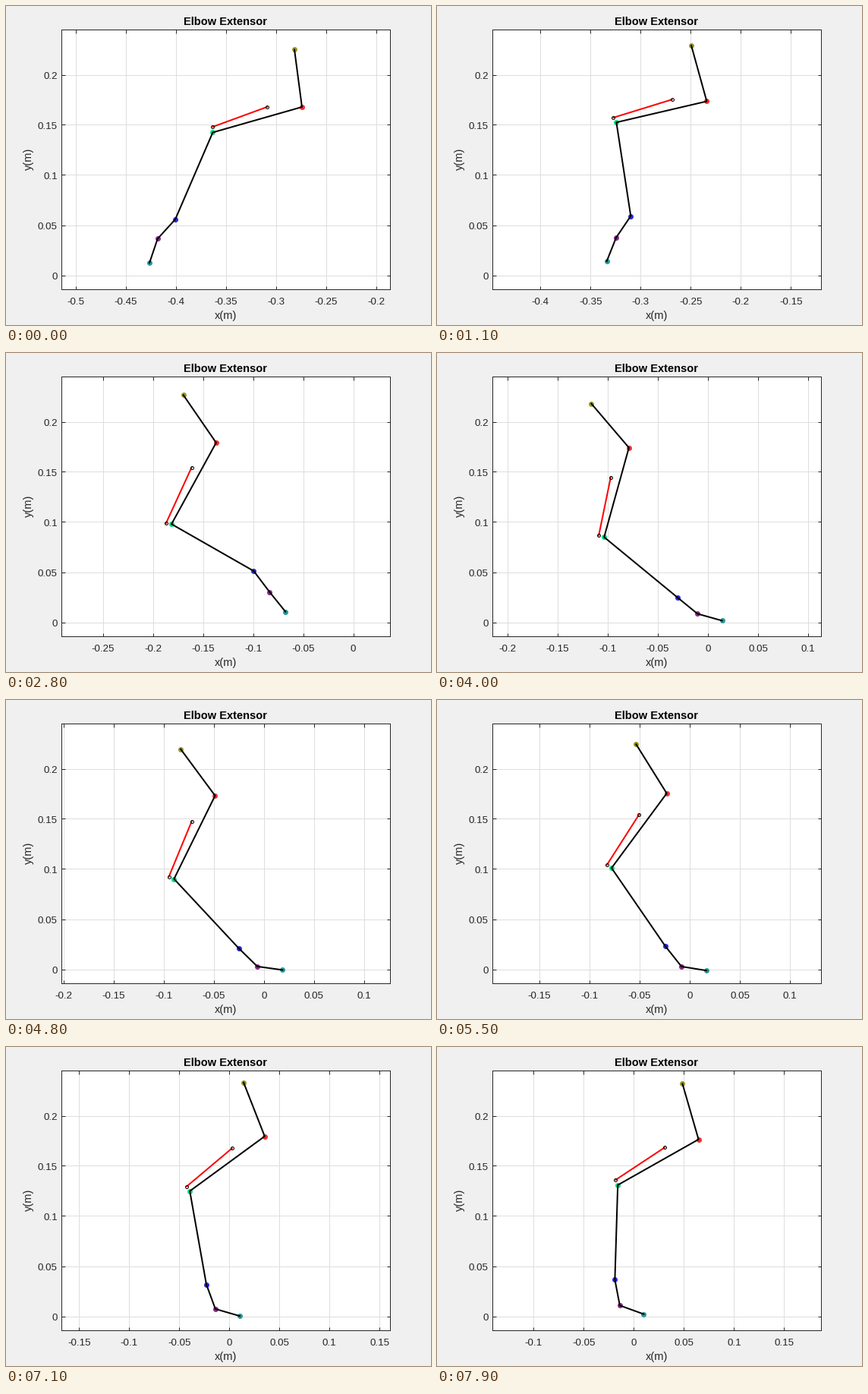
A matplotlib script for the animation above (8 s loop, 560 by 420 pixels).

```python
import numpy as np
import matplotlib.pyplot as plt
from matplotlib.animation import FuncAnimation
from matplotlib.ticker import FuncFormatter, MultipleLocator
from matplotlib.transforms import ScaledTranslation

W, H, DPI = 560, 420, 100
PX = 72 / DPI                       # points per pixel
SCALE = 1320                        # pixels per metre
LEFT, RIGHT, TOP, BOTTOM = 73, 506, 31, 373
GROUND = 354.5                      # pixel row of y = 0
HOLD, FRAMES = 4, 80

# bone lengths in mm
SCAPULA, UPPER, FORE, PAW, DIGIT = 57.7, 92.6, 94.5, 26.1, 25.4


def ramp(k, at, width):
    """Zero before a step, then rising by one per step, with a soft corner."""
    return width * np.log1p(np.exp((k - at) / width))


def fall(k, at, width):
    """Soft switch from one to zero."""
    return 1 / (1 + np.exp((k - at) / width))


def polar(r, deg):
    a = np.radians(deg)
    return r * np.array([np.cos(a), np.sin(a)])


def offset(start, end, along, side):
    """Point beside a bone: distance along it and to its right."""
    u = (end - start) / np.hypot(*(end - start))
    return start + along * u + side * np.array([u[1], -u[0]])


def limb(k):
    """Joints and muscle ends in metres: swing, touchdown near step 30, stance."""
    # the body moves on steadily, slower in stance, and bobs
    shoulder = np.array([
        -274.3 + 5.75 * k - 2.1 * ramp(k, 31, 3),
        176.4 - 3.4 * np.cos(2 * np.pi * (k - 42) / 44) - 5.3 * np.exp(-k / 7)])
    # the wrist swings forward, lands, and is pushed on late in stance
    wrist = np.array([
        -400.8 + 13 * k - 13 * ramp(k, 28.95, 3.6) + 0.6 * ramp(k, 66, 3),
        -7.1 + 0.58 * k + 63 * fall(k, 28.3, 5)])
    scapula = 97.5 + 1.14 * k - 1.8 * ramp(k, 32.3, 3)
    paw = 8.6 - 1.17 * k - 150 * fall(k, 16.5, 6)
    digit = 15.3 - 0.47 * k - 72 * fall(k, 20, 2.1) - 52 * fall(k, 32, 4)

    # the elbow follows from the two bone lengths
    reach = np.hypot(*(wrist - shoulder))
    along = (UPPER ** 2 - FORE ** 2 + reach ** 2) / (2 * reach)
    elbow = offset(shoulder, wrist, along, np.sqrt(max(UPPER ** 2 - along ** 2, 0)))
    knuckle = wrist + polar(PAW, paw)
    joints = [shoulder + polar(SCAPULA, scapula), shoulder, elbow, wrist,
              knuckle, knuckle + polar(DIGIT, digit)]
    muscle = [offset(shoulder, elbow, 33.4, 9.6), offset(elbow, wrist, -5.15, 2.2)]
    return np.array(joints) / 1000, np.array(muscle) / 1000


plt.rcParams["font.family"] = "Liberation Sans"
fig = plt.figure(figsize=(W / DPI, H / DPI), dpi=DPI, facecolor="#f0f0f0")
ax = fig.add_axes([LEFT / W, 1 - BOTTOM / H, (RIGHT - LEFT) / W, (BOTTOM - TOP) / H])
ax.set_ylim((GROUND - BOTTOM) / SCALE, (GROUND - TOP) / SCALE)
ax.set_axisbelow(True)
ax.grid(color="#dedede", lw=PX)
ax.tick_params(direction="in", top=True, right=True, length=4.5 * PX, width=PX,
               color="#262626", labelcolor="#262626", labelsize=13.33 * PX)
ax.tick_params(axis="x", pad=11 * PX)
ax.tick_params(axis="y", pad=5 * PX)
for axis in (ax.xaxis, ax.yaxis):
    axis.set_major_locator(MultipleLocator(0.05))
    axis.set_major_formatter(FuncFormatter(lambda v, _: f"{round(v, 2) + 0:g}"))
for spine in ax.spines.values():
    spine.set(linewidth=PX, edgecolor="#262626")
lower = ScaledTranslation(0, -1.3 / DPI, fig.dpi_scale_trans)
for text in ax.get_yticklabels():
    text.set_transform(text.get_transform() + lower)


def label(x, y, s, **kw):
    fig.text(x / W, 1 - y / H, s, ha="center", va="baseline",
             fontsize=14.67 * PX, **kw)


label(289.5, 25, "Elbow Extensor", weight="bold", color="black")
label(289.5, 412, "x(m)", color="#262626")
label(34, 201, "y(m)", color="#262626", rotation=90, rotation_mode="anchor")

COLORS = ["#9a9a2a", "#f03030", "#00dc82", "#2a2ae0", "#8a2a8a", "#2a9a9a"]
dots = [ax.plot([], [], "o", ms=7 * PX, mew=0, color=c, zorder=3)[0] for c in COLORS]
bones, = ax.plot([], [], color="black", lw=2 * PX, zorder=4, solid_joinstyle="round")
muscle_line, = ax.plot([], [], color="red", lw=2 * PX, zorder=5, marker="o",
                       ms=4 * PX, mfc="none", mec="black", mew=PX)


def draw(n):
    joints, muscle = limb(max(0, n - HOLD))
    for dot, (x, y) in zip(dots, joints):
        dot.set_data([x], [y])
    bones.set_data(*joints.T)
    muscle_line.set_data(*muscle.T)
    # the view stays centred on the limb
    xs = np.concatenate([joints[:, 0], muscle[:, 0]])
    mid, half = (xs.min() + xs.max()) / 2, (RIGHT - LEFT) / SCALE / 2
    ax.set_xlim(mid - half, mid + half)
    return [*dots, bones, muscle_line]


anim = FuncAnimation(fig, draw, frames=FRAMES, interval=100, repeat=True,
                     repeat_delay=0, blit=False)
plt.show()
```
